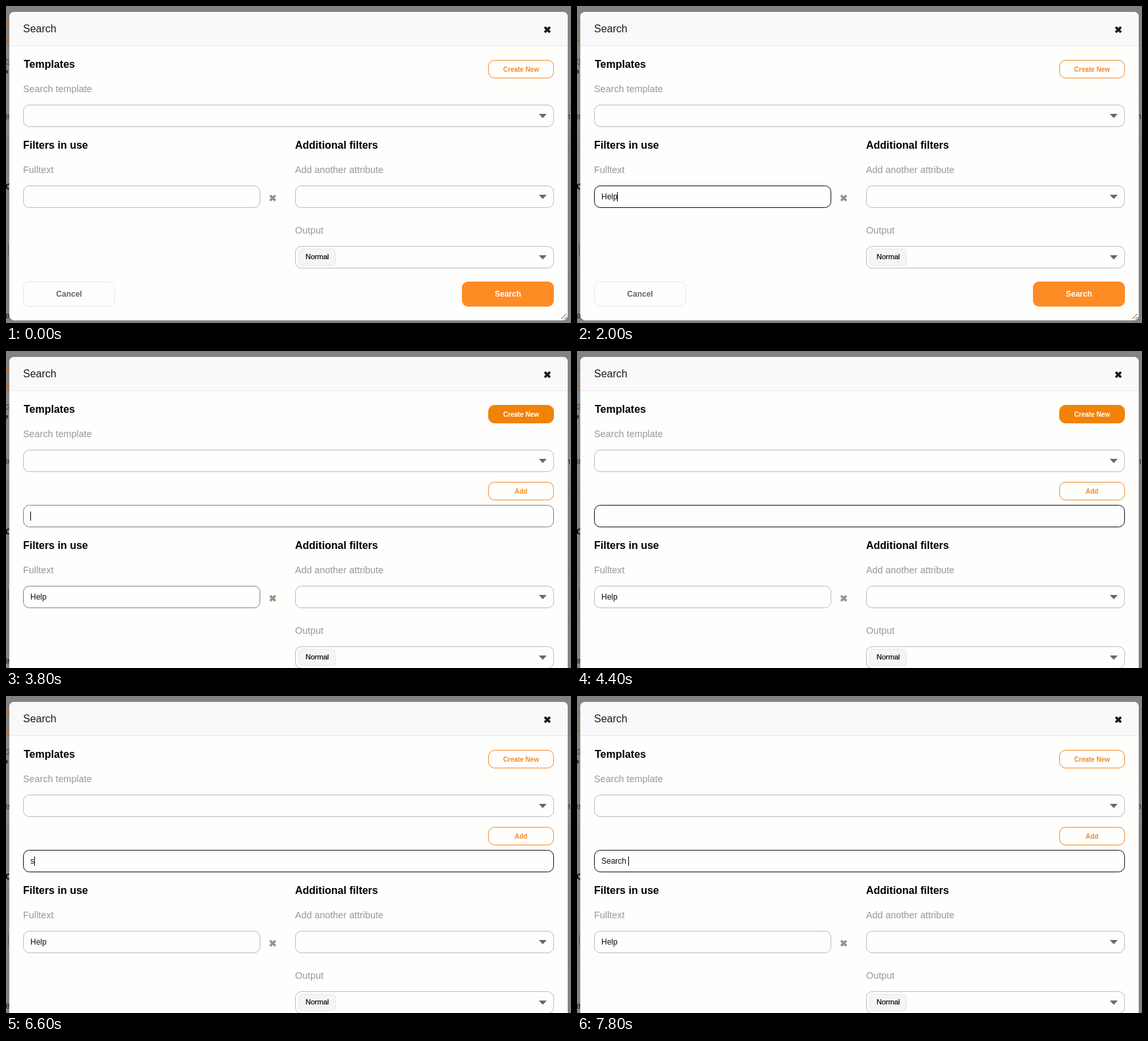
An HTML page that plays this animation: 860x482 px, repeating every 8000 ms.

```html
<!DOCTYPE html>
<html lang="en">
<head>
<meta charset="utf-8">
<title>Search dialog</title>
<style>
html, body { margin: 0; width: 100%; height: 100%; overflow: hidden; background: #838385; }
svg { display: block; width: 860px; height: 482px; font-family: "Liberation Sans", Arial, sans-serif; }
text { white-space: pre; }
.title { font-size: 16px; fill: #1c1c1c; }
.head { font-size: 16px; font-weight: bold; }
.label { font-size: 14.4px; fill: #979797; }
.typed { font-size: 12px; fill: #111; }
.btn { font-size: 12px; font-weight: bold; text-anchor: middle; }
.small { font-size: 10px; font-weight: bold; text-anchor: middle; fill: #f38a27; }
.box { fill: #fefefd; stroke: #bbb; }
.orange { fill: #fefefd; stroke: #f38a27; }
.arrow { fill: #686868; }
.tip rect { fill: #2d2d2d; filter: drop-shadow(0 3px 4px rgba(0, 0, 0, .3)); }
.tip text { font: 13.6px "Open Sans", "Noto Sans", sans-serif; fill: #fff; }
</style>
</head>
<body>
<svg viewBox="0 0 860 482">
  <defs>
    <path id="arrow" class="arrow" d="M-6-3H6L0 3.5Z"/>
    <path id="cross" d="M-4-4L4 4M4-4L-4 4" stroke-width="3.6"/>
  </defs>

  <!-- dimmed page behind the dialog -->
  <path d="M0 62H860V192H0Z" fill="#87878a"/>
  <path d="M0 125.500H860M0 150.500H860M0 219.500H860M0 331.500H860M0 405.500H860" stroke="#7b7b7d"/>
  <g font-size="13" fill="#333" text-anchor="end">
    <text x="6" y="31" fill="#b8641c">et</text>
    <text x="7" y="89" font-size="11">G</text>
    <text x="6" y="172">le</text>
    <text x="859" y="172">n</text>
    <text x="8" y="279" font-size="16" font-weight="bold" fill="#111">c</text>
    <text x="6" y="475" fill="#111">e</text>
  </g>
  <path d="M0 53H6" stroke="#c0661a" stroke-width="3"/>
  <circle cx="0" cy="100" r="3" fill="#333"/>
  <path d="M3.500 363V379" stroke="#555"/>

  <!-- dialog -->
  <rect id="panel" x="5" y="9" width="850" height="469" rx="8" fill="#fefefd"/>
  <path d="M5 61V17Q5 9 13 9H847Q855 9 855 17V61Z" fill="#f9f9fc"/>
  <path d="M5 60.500H855" stroke="#e7e7ea"/>
  <text class="title" x="26" y="40">Search</text>
  <use href="#cross" x="824" y="36" stroke="#1a1a1a"/>

  <text class="head" x="27" y="94">Templates</text>
  <rect id="create" class="orange" x="734.5" y="82.5" width="99" height="27" rx="9"/>
  <text id="createText" class="small" x="784" y="100">Create New</text>
  <text class="label" x="26" y="131">Search template</text>
  <rect class="box" x="26.5" y="150.5" width="807" height="33" rx="9"/>
  <use href="#arrow" x="817" y="167"/>

  <g id="adder">
    <rect class="orange" x="734.5" y="199.5" width="99" height="27" rx="9"/>
    <text class="small" x="784" y="217">Add</text>
    <rect id="nameBox" class="box" x="26.5" y="234.5" width="807" height="33" rx="9"/>
    <text id="name" class="typed" x="37" y="255"></text>
  </g>

  <g id="lower">
    <text class="head" x="26" y="217">Filters in use</text>
    <text class="label" x="26" y="254">Fulltext</text>
    <rect id="fullBox" class="box" x="26.5" y="273.5" width="360" height="33" rx="9"/>
    <text id="full" class="typed" x="37" y="294"></text>
    <use href="#cross" x="406" y="292" stroke="#96918d"/>

    <text class="head" x="440" y="217">Additional filters</text>
    <text class="label" x="440" y="254">Add another attribute</text>
    <rect class="box" x="440.5" y="273.5" width="393" height="33" rx="9"/>
    <use href="#arrow" x="817" y="290"/>

    <text class="label" x="440" y="346">Output</text>
    <rect class="box" x="440.5" y="365.5" width="393" height="33" rx="9"/>
    <rect x="445.5" y="369.5" width="56" height="25" rx="5" fill="#f5f5f6" stroke="#e6e6e8"/>
    <text x="456" y="385" font-size="11" stroke="#000" stroke-width=".2">Normal</text>
    <use href="#arrow" x="817" y="382"/>

    <rect x="26.5" y="419.5" width="139" height="37" rx="9" fill="#fefefd" stroke="#e6e6e6"/>
    <text class="btn" x="96" y="442" fill="#666">Cancel</text>
    <rect x="694" y="419" width="140" height="38" rx="9" fill="#ff8b24"/>
    <text class="btn" x="764" y="442" fill="#fff">Search</text>
    <path d="M845 476L853 468M850 476L853 473" stroke="#555"/>
  </g>

  <path id="caret" d="M.5 0V14" stroke="#000"/>

  <g id="helpTip" class="tip">
    <rect x="62" y="247" width="199" height="35" rx="6"/>
    <text x="81" y="270">Helping</text>
    <text x="157" y="270">Helpful</text>
    <ellipse cx="238.5" cy="268" rx="6.5" ry="3.500" fill="#35203c"/>
    <path d="M232 268A6.500 3.500 0 0 1 245 268" fill="none" stroke="#b79bc4"/>
  </g>
  <g id="nameTip" class="tip">
    <rect x="45" y="208" width="404" height="35" rx="6"/>
    <text x="64" y="231">Search</text>
    <text x="139" y="231">Something</text>
    <text x="244" y="231">Sometimes</text>
    <text x="349" y="231">Schedules</text>
  </g>
</svg>
<script>
const LOOP = 8000, STEP = 200, BLINK = 500;
const OPEN = 3800, SHIFT = 84;
const $ = id => document.getElementById(id);

// [time, text] pairs
const fullKeys = [[200, ""], [1400, "H"], [1600, "He"], [1800, "Hel"], [2000, "Help"]];
const nameKeys = [[OPEN, ""], [6600, "s"], [7000, ""], [7200, "S"], [7600, "Sear"], [7800, "Search "]];

const within = (t, a, b) => t >= a && t < b;
const ramp = (t, a, b) => Math.min(1, Math.max(0, (t - a) / (b - a)));
const mix = (a, b, p) => `rgb(${a.map((v, i) => Math.round(v + (b[i] - v) * p))})`;
const show = (id, on) => $(id).style.display = on ? "" : "none";
const lastKey = (keys, t) => keys.filter(k => k[0] <= t).pop() || [0, ""];
const border = (id, p) => $(id).style.stroke = mix([187, 187, 187], [17, 17, 17], p);

function placeCaret(id, since, y, t) {
  const x = 37 + $(id).getComputedTextLength();
  $("caret").setAttribute("transform", `translate(${Math.floor(x)} ${y})`);
  show("caret", Math.floor((t - since) / BLINK) % 2 === 0);
}

function draw(t) {
  const open = t >= OPEN;
  show("adder", open);
  $("panel").setAttribute("height", 469 + (open ? SHIFT : 0));
  $("lower").setAttribute("transform", `translate(0 ${open ? SHIFT : 0})`);

  const [fullTime, fullText] = lastKey(fullKeys, t);
  const [nameTime, nameText] = lastKey(nameKeys, t);
  $("full").textContent = fullText;
  $("name").textContent = nameText;

  border("fullBox", ramp(t, 0, 600) - ramp(t, 3400, 4000));
  border("nameBox", ramp(t, 3600, 4200));

  const hover = ramp(t, 3200, 3600) - ramp(t, 4400, 5000);
  $("create").style.fill = mix([254, 254, 253], [240, 131, 8], hover);
  $("create").style.stroke = mix([243, 138, 39], [240, 131, 8], hover);
  $("createText").style.fill = mix([243, 138, 39], [255, 255, 255], hover);

  if (open) placeCaret("name", nameTime, 244, t);
  else if (within(t, 200, 3600)) placeCaret("full", fullTime, 283, t);
  else show("caret", false);

  show("helpTip", within(t, 2200, 3400));
  show("nameTip", within(t, 6800, 7000) || within(t, 7400, 7600));
}

const start = performance.now();
function tick(now) {
  const t = Math.max(0, now - start) % LOOP;
  draw(Math.floor(t / STEP) * STEP);
  requestAnimationFrame(tick);
}
draw(0);
requestAnimationFrame(tick);
</script>
</body>
</html>
```
